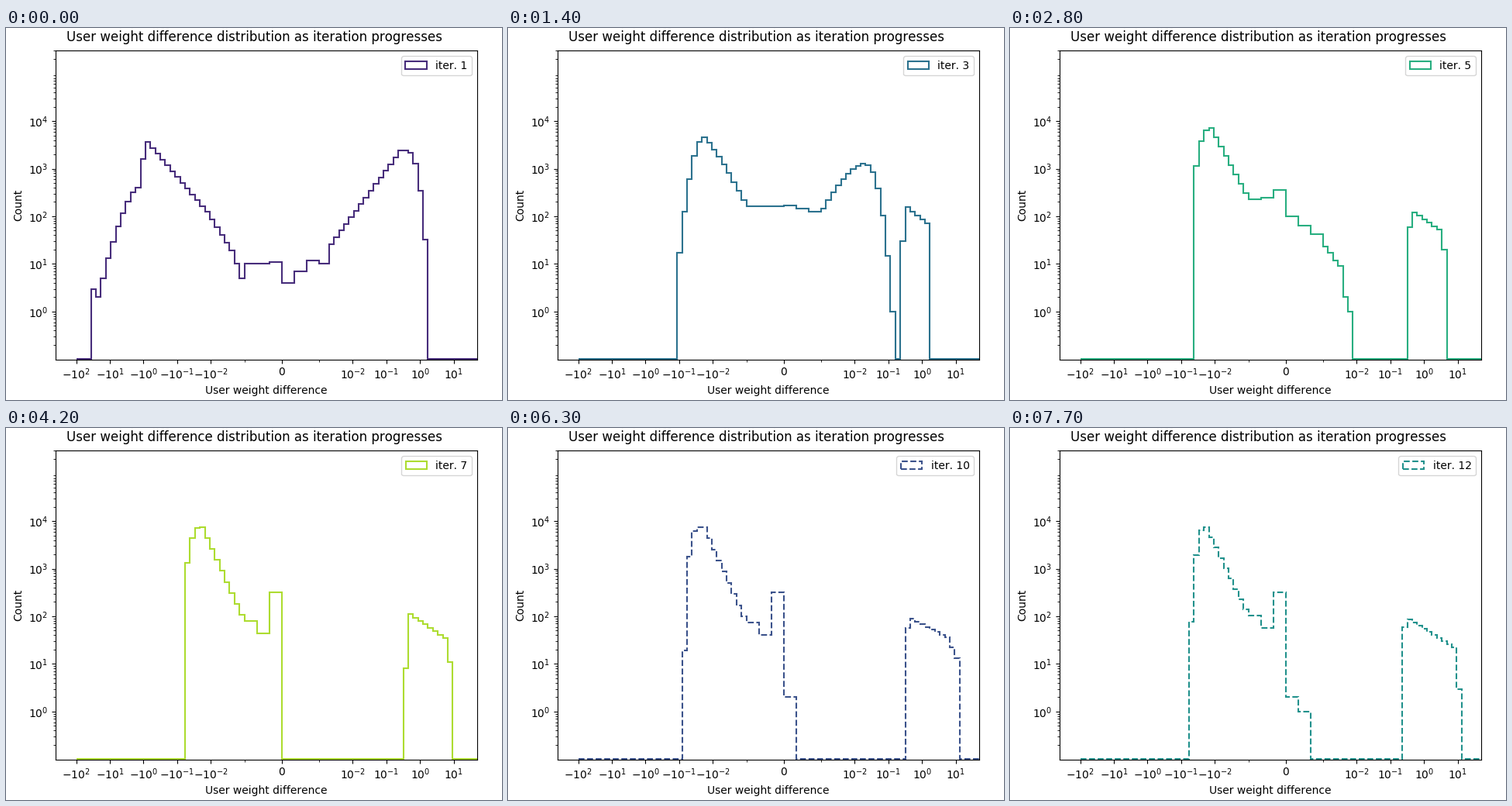
A matplotlib script that plays this animation: 640x480 px, repeating every 8000 ms.

```python
import numpy as np
import matplotlib.pyplot as plt
from matplotlib.animation import FuncAnimation
from matplotlib.patches import Patch
from matplotlib.ticker import NullFormatter

plt.rcParams["font.family"] = "DejaVu Sans"
plt.rcParams["text.kerning_factor"] = 6

W, H, DPI = 640, 480, 100
STEP_MS, TICK_MS, LOOP_MS = 700, 100, 8000
FLOOR = 0.1
LINE = 1.5

# Log-spaced bins on both sides of a short linear stretch around zero.
wing = np.logspace(-3, 2, 35)
edges = np.concatenate([-wing[::-1], np.linspace(-1e-3, 1e-3, 7)[1:-1], wing])
BINS = len(edges) - 1


def profile(*arches):
    """Histogram of arches, each a chain of (bin, count[, bow]) knots.

    Log counts run straight between knots, or arch upwards if bow > 1.
    """
    out = np.full(BINS, FLOOR)
    for arch in arches:
        for (k0, c0, *_), (k1, c1, *bow) in zip(arch, arch[1:]):
            power = bow[0] if bow else 1
            t = np.linspace(0, 1, k1 - k0 + 1)
            ease = 1 - (1 - t) ** power if c1 > c0 else t ** power
            out[k0:k1 + 1] = np.round(c0 * (c1 / c0) ** ease)
    return out


def settled(first, base, bow, tail):
    """Left lobe and centre spike shared by the later iterations."""
    return [(first, base), (25, 7500, bow), (33, tail), (34, 0.75 * tail),
            (35, 0.4 * tail), (36, 320)]


def between(a, b):
    """Geometric mean of two histograms, empty below one count."""
    mid = np.round(np.sqrt(a * b))
    return np.where(mid < 1, FLOOR, mid)


hists = {}
hists[1] = profile(
    [(3, 3), (4, 2), (12, 400, 1.5), (13, 1585), (14, 3610), (26, 124),
     (31, 19), (33, 5), (34, 10), (36, 11), (37, 4), (39, 12), (40, 10),
     (41, 10), (42, 26), (56, 2390), (57, 2390), (61, 32, 2.8)])
hists[2] = profile(
    [(16, 8), (20, 3600, 2), (21, 3900), (33, 60, 1.2), (34, 50), (41, 50),
     (52, 1700, 1.3), (57, 250, 2), (61, 75)])
hists[3] = profile(
    [(20, 17), (25, 4520, 2), (33, 218, 1.2), (34, 161), (36, 161),
     (37, 168), (39, 124), (40, 144), (48, 1267, 1.55), (54, 1, 2.6)],
    [(56, 30), (57, 155), (61, 70)])
hists[5] = profile(
    [(23, 1130), (26, 7080, 2.7), (33, 305), (34, 226), (35, 244),
     (36, 355), (37, 99), (39, 42), (40, 23), (43, 9), (44, 2), (45, 1)],
    [(57, 59), (58, 120), (63, 52), (64, 20)])
hists[7] = profile(settled(22, 1315, 3, 107),
                   [(57, 8), (58, 111), (65, 35), (66, 11)])
hists[8] = profile(settled(21, 38, 5, 83),
                   [(57, 9), (58, 107), (62, 47), (64, 47), (66, 28)])
hists[10] = profile(settled(21, 19, 5, 99) + [(37, 2)],
                    [(57, 57), (58, 89), (65, 36), (67, 13)])
hists[12] = profile(settled(22, 76, 3, 139) + [(37, 2), (38, 1)],
                    [(56, 59), (57, 86), (66, 22), (67, 3)])
for n in (4, 6, 9, 11):
    hists[n] = between(hists[n - 1], hists[n + 1])


def power_label(p, sign=""):
    return rf"$\mathdefault{{{sign}10^{{{p}}}}}$"


fig = plt.figure(figsize=(W / DPI, H / DPI), dpi=DPI, facecolor="white")
left, right, bottom, top = 63.78, 608, 52.4, 450.7
ax = fig.add_axes([left / W, bottom / H, (right - left) / W,
                   (top - bottom) / H])
fig.text(0.5, 1 - 17 / H, ha="center", va="baseline", fontsize=12,
         s="User weight difference distribution as iteration progresses")

steps = ax.stairs(hists[1], edges, baseline=FLOOR, lw=LINE)

ax.set_xscale("symlog", linthresh=1e-3, linscale=1)
ax.set_yscale("log")
neg, pos = range(2, -3, -1), range(-2, 2)
ax.set_xticks([-10.0 ** p for p in neg] + [0] + [10.0 ** p for p in pos],
              [power_label(p, "-") for p in neg] + [r"$\mathdefault{0}$"]
              + [power_label(p) for p in pos])
ax.set_xticks([-1e-3, 1e-3], minor=True)
ax.set_yticks([10.0 ** p for p in range(5)],
              [power_label(p) for p in range(5)])
ax.set_yticks([m * 10.0 ** p for p in range(-1, 6) for m in range(2, 10)
               if m * 10.0 ** p <= 3e5], minor=True)
for axis in (ax.xaxis, ax.yaxis):
    axis.set_minor_formatter(NullFormatter())
ax.set_xlim(-414, 50)
# A hair below the floor, so the empty bins show above the axis line.
ax.set_ylim(0.99 * FLOOR, 3e5)
ax.set_xlabel("User weight difference")
ax.set_ylabel("Count")


def draw(i):
    n = 1 + i * TICK_MS // STEP_MS
    style = dict(edgecolor=plt.cm.viridis(n % 8 / 8),
                 linestyle="-" if n < 8 else "--")
    steps.set_data(hists[n])
    steps.set(**style)
    key = Patch(fill=False, lw=LINE, label=f"iter. {n}", **style)
    ax.legend(handles=[key], loc="upper right")
    return steps,


anim = FuncAnimation(fig, draw, frames=LOOP_MS // TICK_MS, interval=TICK_MS,
                     repeat=True, repeat_delay=0, blit=False)
plt.show()
```
